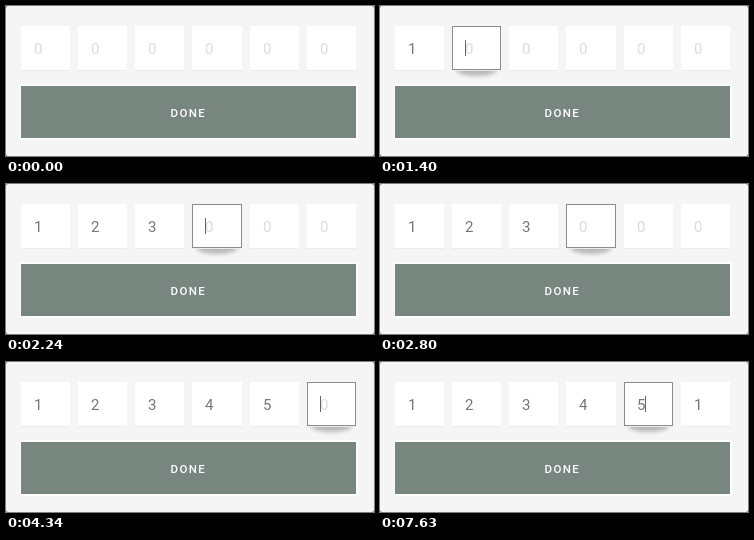
An HTML page that plays this animation: 368x150 px, repeating every 8000 ms.

```html
<!DOCTYPE html>
<html lang="en">
<head>
<meta charset="utf-8">
<title>Code entry</title>
<style>
  html, body { margin: 0; width: 100%; height: 100%; overflow: hidden; background: #555; }
  svg { display: block; width: 100%; height: 100%; }
  text { font-family: Roboto, sans-serif; }
  .digit { font-size: 15px; fill: #dcdcdc; }
  .filled { fill: #757575; }
  .done { font-size: 11.5px; font-weight: 500; letter-spacing: 1.4px; fill: #fff; }
</style>
</head>
<body>
<svg viewBox="0 0 368 150">
  <defs>
    <filter id="soft" x="-30%" y="-100%" width="160%" height="300%">
      <feGaussianBlur stdDeviation="2"/>
    </filter>
  </defs>
  <rect width="368" height="150" rx="2" fill="#f5f5f5"/>
  <g id="cells"></g>
  <rect x="14" y="78" width="338" height="56" fill="#fcfcfc"/>
  <rect x="15" y="80" width="335" height="52" fill="#788680"/>
  <text class="done" x="164.5" y="111">DONE</text>
</svg>
<script>
const LOOP = 8000;
const CODE = '123451';
const PITCH = 57.25, WIDTH = 49.25, LEFT = 15, TOP = 20, HEIGHT = 44;

// When each digit appears, and [start, end, cell] spans for focus and caret.
const typedAt = [1400, 1820, 2240, 3220, 4340, 5110];
const focusSpans = [
  [840, 1400, 0], [1400, 1820, 1], [1820, 2240, 2], [2240, 3220, 3],
  [3220, 4340, 4], [4340, 5110, 5], [7630, LOOP, 4]
];
const caretOff = [[2800, 3220], [3780, 4340], [4830, 5110]];

const group = document.getElementById('cells');

function add(parent, tag, attrs) {
  const node = document.createElementNS('http://www.w3.org/2000/svg', tag);
  for (const key in attrs) node.setAttribute(key, attrs[key]);
  return parent.appendChild(node);
}

const cells = [...CODE].map((digit, i) => {
  const start = LEFT + PITCH * i;
  const x = Math.floor(start), width = Math.floor(start + WIDTH) - x;
  const shadow = add(group, 'ellipse', {
    cx: x + width / 2, cy: 64, rx: 20, ry: 6, fill: '#000', opacity: .25, filter: 'url(#soft)'
  });
  add(group, 'rect', { x, y: TOP + 1, width, height: HEIGHT, fill: '#ebebeb' });
  add(group, 'rect', { x, y: TOP, width, height: HEIGHT, fill: '#fff' });
  const border = add(group, 'rect', {
    x: x + .5, y: TOP + .5, width: width - 1, height: HEIGHT - 1, fill: 'none', stroke: '#8c8c8c'
  });
  const label = add(group, 'text', { x: x + 13, y: 47.5, class: 'digit' });
  const caret = add(group, 'rect', { y: 34, width: 1, height: 16, fill: '#666' });
  return { digit, x, shadow, border, label, caret };
});

const within = (t, [start, end]) => t >= start && t < end;

function show(node, visible) {
  node.setAttribute('visibility', visible ? 'visible' : 'hidden');
}

function render(t) {
  const focus = focusSpans.find(span => within(t, span));
  const caretOn = !caretOff.some(span => within(t, span));
  cells.forEach((cell, i) => {
    const filled = t >= typedAt[i];
    const focused = !!focus && focus[2] === i;
    cell.label.textContent = filled ? cell.digit : '0';
    cell.label.classList.toggle('filled', filled);
    cell.caret.setAttribute('x', cell.x + (filled ? 21 : 13));
    show(cell.shadow, focused);
    show(cell.border, focused);
    show(cell.caret, focused && caretOn);
  });
}

const origin = performance.now();
function tick() {
  render((performance.now() - origin) % LOOP);
  requestAnimationFrame(tick);
}
tick();
</script>
</body>
</html>
```
